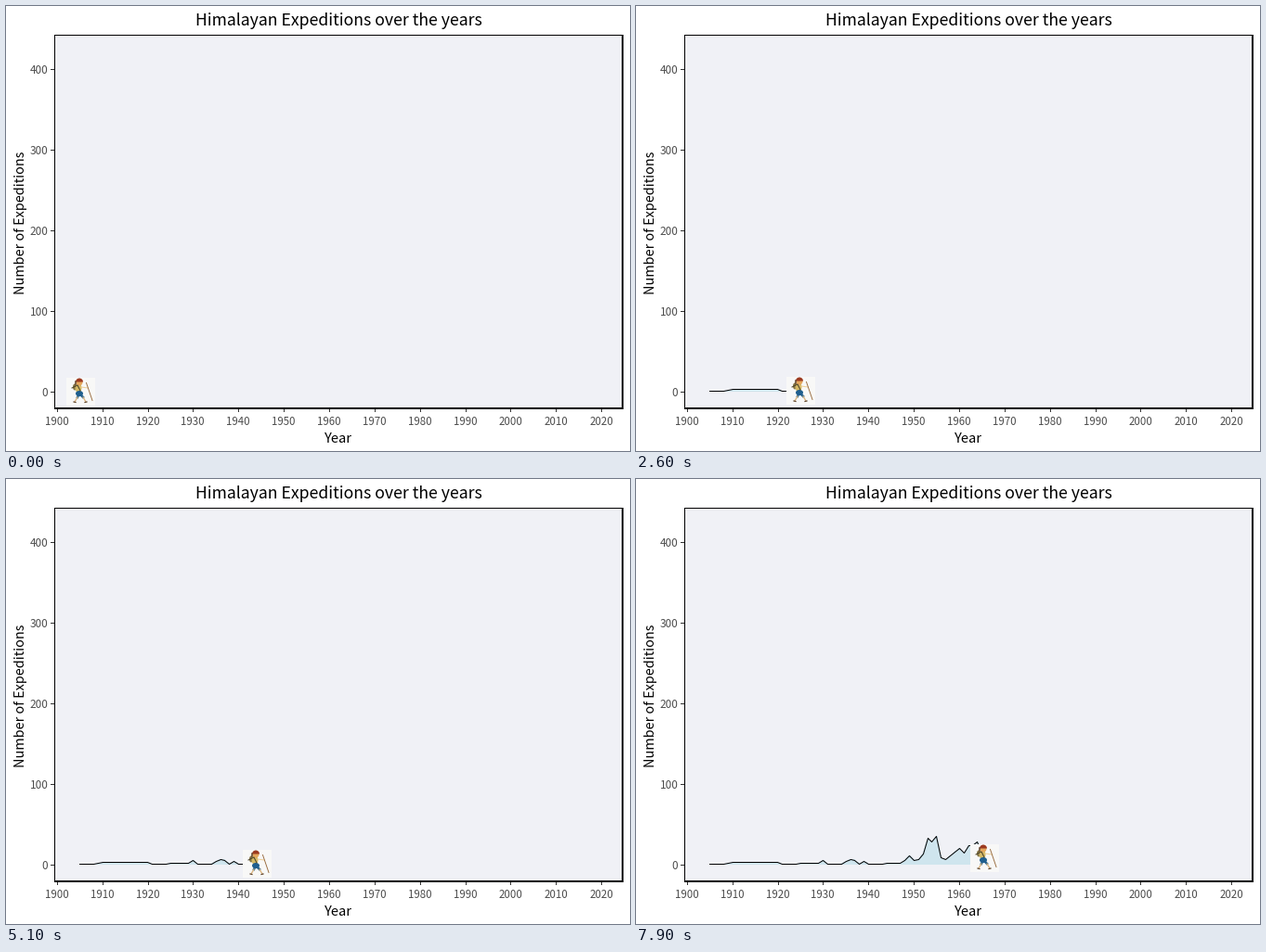
Write a matplotlib script that moves like this. It is 672x480 px and loops after 8 s.

```python
import numpy as np
import matplotlib.pyplot as plt
from matplotlib.animation import FuncAnimation
from matplotlib.patches import Ellipse, Polygon, Rectangle, Wedge
from matplotlib.transforms import Affine2D

W, H, DPI = 672, 480, 100
FRAMES, INTERVAL = 80, 100
PX = 72 / DPI  # one pixel in points
START, STEP = 1905, 0.7645  # first year, years per frame

plt.rcParams["font.family"] = "Noto Sans CJK JP"


def px(year):
    return 55.2 + 4.885 * (year - 1900)


def py(count):
    return 416.6 - 0.871 * count


def center(v):
    """Middle of the pixel that holds v."""
    return np.floor(v) + 0.5


def season(peak, height, rise, fall):
    """A run of busy years: straight up to the peak, straight down after."""
    d = YEARS - peak
    return height * np.minimum(1 + d / rise, 1 - d / fall)


# One or a few trips a year at first, then ever higher waves
YEARS = np.arange(1905, 1967)
COUNTS = np.ones(len(YEARS))
for first, last in ((1909, 1920), (1910, 1920), (1925, 1929), (1944, 1947)):
    COUNTS += (YEARS >= first) & (YEARS <= last)
for wave in ((1930, 6, 1, 1), (1936.5, 9, 3, 1.7), (1939, 5, 1, 1),
             (1949, 12, 2, 2), (1953, 33, 1, 1), (1955, 36, 5, 1.33),
             (1960, 21, 4.5, 3), (1962, 24, 1, 3), (1964, 29, 6, 2)):
    COUNTS = np.maximum(COUNTS, season(*wave))

fig = plt.figure(figsize=(W / DPI, H / DPI), dpi=DPI, facecolor="white")
ax = fig.add_axes([0, 0, 1, 1])
ax.set_xlim(0, W)
ax.set_ylim(H, 0)
ax.axis("off")


def box(x, y, w, h, color, z=1):
    ax.add_patch(Rectangle((x, y), w, h, fc=color, lw=0, aa=False, zorder=z))


def label(x, y, text, size, color="black", ha="center", rot=0):
    ax.text(x, y, text, fontsize=size * PX, color=color, ha=ha,
            va="baseline", rotation=rot, rotation_mode="anchor")


# Panel, border and axes
box(52, 31, 612, 403, "#f0f1f6")
box(52, 31, 1, 404, "black", 6)
box(52, 31, 613, 1, "black", 6)
box(663, 31, 2, 404, "black", 6)
box(52, 433, 613, 2, "black", 6)

for count in range(0, 401, 100):
    y = int(py(count))
    box(48, y, 4, 1, "#333333")
    label(45.3, y + 5, str(count), 11.7, "#4d4d4d", "right")
for year in range(1900, 2021, 10):
    x = round(px(year) - 0.3)
    box(x, 435, 1, 3, "#333333")
    label(x, 452, str(year), 11.5, "#4d4d4d")

label(358, 21, "Himalayan Expeditions over the years", 17.7)
label(358, 471, "Year", 14.6)
label(20, 233.5, "Number of Expeditions", 14.4, rot=90)

# Growing area with its outline
area = Polygon([(0, 0)] * 3, fc="#cfe5ee", lw=0, aa=False, zorder=2)
ax.add_patch(area)
line, = ax.plot([], [], color="black", lw=PX, zorder=3)

# Hiker, drawn around the current data point
move = Affine2D()
place = move + ax.transData


def part(patch, color):
    patch.set(fc=color, lw=0, zorder=4, transform=place)
    ax.add_patch(patch)


def limb(color, xs, ys, width=1):
    ax.plot(xs, ys, color=color, lw=width * PX, zorder=5, transform=place)


part(Rectangle((-15, -15), 31, 29.5), "#f8f8f7")
part(Ellipse((-6, -5), 4, 7), "#857645")
part(Ellipse((-2, -4), 7, 10), "#d3b965")
part(Ellipse((-1, -10), 7, 7), "#e5a75c")
part(Wedge((-1, -10.5), 4, 180, 360), "#9c3a20")
part(Ellipse((-1, 2), 8, 6), "#1f5f8f")
limb("#5b3a20", (-5, -5), (-11, -8), 1.5)
limb("#4a4028", (-9, -3, 0), (-4, -7, -1))
limb("#efd09a", (1, 8), (-5, -4))
for side in (-1, 1):
    limb("#1f5f8f", (-1, 3 * side), (2, 6), 2.5)
    limb("#d9b27c", (3 * side, 6 * side), (6, 11), 1.3)
    limb("#5e4630", (5 * side, 7 * side), (11.5, 11), 1.2)
limb("#96683a", (6.5, 13), (-9.5, 9.5), 0.9)


def update(i):
    now = START + STEP * i
    past = YEARS < now
    years = np.append(YEARS[past], now)
    xs, ys = px(years), py(np.interp(years, YEARS, COUNTS))
    line.set_data(center(xs), center(ys))
    base = np.floor(py(0))
    area.set_xy([(xs[0], base), *zip(xs, ys), (xs[-1], base)])
    move.clear().translate(round(xs[-1]), round(ys[-1]))
    return area, line


anim = FuncAnimation(fig, update, frames=FRAMES, interval=INTERVAL,
                     repeat=True, repeat_delay=0, blit=False)
plt.show()
```
